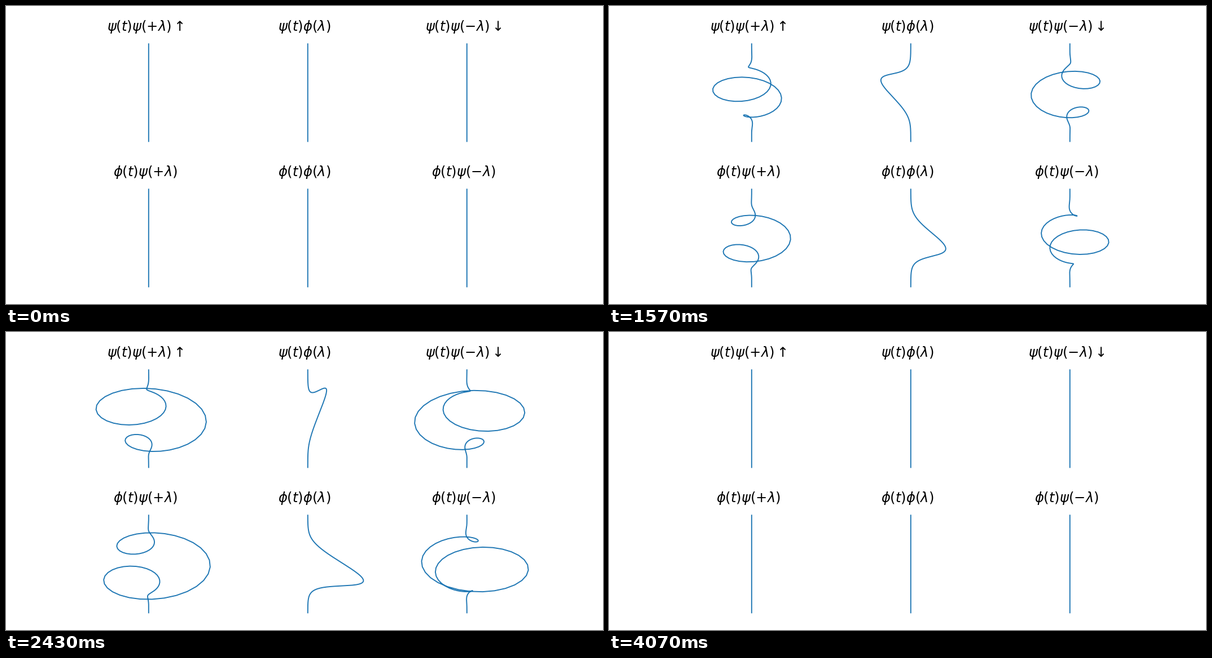
Animation of 1058x529 px, one loop 4260 ms. Source, as a matplotlib script:

```python
import numpy as np
import matplotlib.pyplot as plt
from matplotlib.animation import FuncAnimation

W, H, DPI = 1058, 529, 92
N = 128                       # samples per wavelet, one animation frame each
LOOP_MS = 4260

# 1D building blocks: Gaussian low-pass and zero-mean Morlet
n = np.arange(N) - N // 2
sigma = N / (2 * np.pi * 1.35)
xi = 2 * np.pi * 4 / N
phi = np.exp(-n**2 / (2 * sigma**2)) + 0j
psi = phi * (np.exp(1j * xi * n) - np.exp(-(xi * sigma)**2 / 2))

# Perspective camera over a 4:4:3 box
ELEV, AZIM, DIST = np.radians(30), np.radians(-60), 10
SCALE = 233.1                 # pixels per box unit
RADIUS, HALF_Z = 4 / 7, 3 / 7
z = np.linspace(-HALF_Z, HALF_Z, N)


def project(wave, cx, cy):
    """Screen path of a complex wave running up the vertical axis."""
    x, y = RADIUS * wave.real, RADIUS * wave.imag
    se, ce = np.sin(ELEV), np.cos(ELEV)
    sa, ca = np.sin(AZIM), np.cos(AZIM)
    right = -sa * x + ca * y
    up = -se * ca * x - se * sa * y + ce * z
    near = ce * ca * x + ce * sa * y + se * z
    k = SCALE * DIST / (DIST - near)
    return cx + k * right, cy - k * up


# title, time factor, frequency factor
PANELS = [
    (r"$\psi(t)\psi(+\lambda) \uparrow$", psi, psi),
    (r"$\psi(t)\phi(\lambda)$", psi, phi),
    (r"$\psi(t)\psi(-\lambda) \downarrow$", psi, psi.conj()),
    (r"$\phi(t)\psi(+\lambda)$", phi, psi),
    (r"$\phi(t)\phi(\lambda)$", phi, phi),
    (r"$\phi(t)\psi(-\lambda)$", phi, psi.conj()),
]

fig = plt.figure(figsize=(W / DPI, H / DPI), dpi=DPI, facecolor="white")
ax = fig.add_axes([0, 0, 1, 1])
ax.set_xlim(0, W)
ax.set_ylim(H, 0)
ax.axis("off")

curves = []
for i, (title, in_time, in_freq) in enumerate(PANELS):
    row, col = divmod(i, 3)
    mid = W / 2 + 282 * (col - 1)
    ax.text(mid, 44 + 258 * row, title, fontsize=19, ha="center",
            va="baseline", color="black")
    line, = ax.plot([], [], color="#1f77b4", lw=1.5)
    curves.append((line, in_time, in_freq, mid + 5.8, 155.7 + 258 * row))


def update(t):
    for line, in_time, in_freq, cx, cy in curves:
        line.set_data(*project(in_time[t] * in_freq, cx, cy))
    return [c[0] for c in curves]


anim = FuncAnimation(fig, update, frames=N, interval=LOOP_MS / N,
                     init_func=lambda: update(0), repeat=True,
                     repeat_delay=0, blit=False)
plt.show()
```
